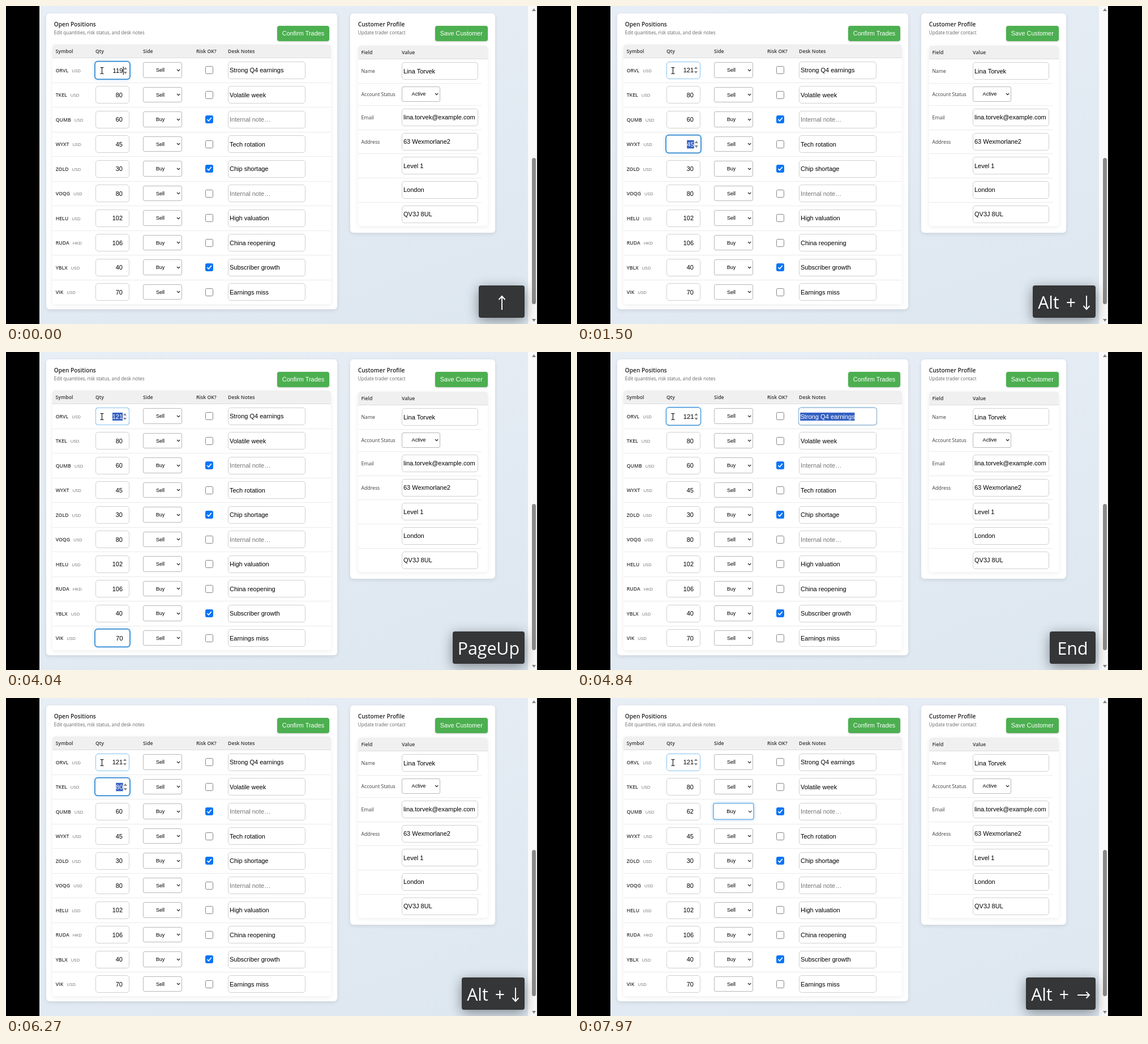
An HTML page for the animation above (8000 ms loop, 998 by 561 pixels).

```html
<!DOCTYPE html>
<html lang="en">
<head>
<meta charset="utf-8">
<title>Desk positions</title>
<style>
html, body { margin: 0; width: 100%; height: 100%; overflow: hidden; background: #000; }
#stage { position: absolute; left: 0; top: 0; width: 998px; height: 561px; overflow: hidden; background: #000; }
#stage div { position: absolute; box-sizing: border-box; white-space: pre; }
svg { position: absolute; overflow: visible; }
.page { background: linear-gradient(160deg, #e8eef6, #dde7f0); }
.card { background: #fff; border-radius: 6px; box-shadow: 0 2px 7px rgba(0,0,0,.1); }
.table { background: #fff; border-radius: 5px; box-shadow: 0 2px 8px rgba(0,0,0,.07); }
.head { background: #f0f0f0; border-bottom: 1px solid #ddd; border-radius: 5px 5px 0 0; }
.line { background: #ebebeb; }
.text { font: 8.7px/20px "Open Sans", "Noto Sans", sans-serif; color: #3c3c3c; }
.title { font-size: 10.2px; font-weight: 600; color: #222; }
.sub { font-size: 8.2px; color: #666; }
.bold { font-weight: 600; color: #333; }
.bold i { font: 400 7.8px "Open Sans", "Noto Sans", sans-serif; color: #6e6e6e; margin-left: 6px; }
.button { background: #4caf50; border-radius: 4px; color: #fff; text-align: center;
  font: 10.9px/27px "Liberation Sans", Arial, sans-serif; box-shadow: 0 1px 3px rgba(0,0,0,.2); }
.field { --f: 0; --base: #d0d0d0; --ring: #2380cc; --spread: .35px;
  display: flex; align-items: center; background: #fff; color: #000;
  font: 11px/14px "Liberation Sans", Arial, sans-serif; border-radius: 5px;
  border: 1px solid color-mix(in srgb, var(--ring) calc(var(--f) * 100%), var(--base));
  transform: scale(calc(1 + .04 * var(--f)));
  box-shadow: 0 0 0 calc(var(--f) * var(--spread)) var(--ring), 0 0 5px rgba(40,140,225,calc(var(--f) * .5)); }
.note { padding-left: 2px; }
.qty { justify-content: flex-end; padding-right: 11px; }
.select { --base: #b8b8b8; --ring: #4a9bdc; --spread: 0px; border-radius: 3px;
  justify-content: center; padding-right: 8px; font-size: 9.1px; }
.empty { color: #757575; }
.field b { font-weight: 400; }
.picked { background: #3460c2; color: #fff; }
.caret { border-right: 1px solid #000; margin-right: -1px; }
.check { border: 1px solid #858585; border-radius: 2.5px; background: #fff; }
.check.on { border-color: #0875f5; background: #0875f5; }
#key { right: 82px; top: 493px; height: 56.5px; min-width: 81px; padding: 4px 9px 0; display: flex; gap: 12px;
  align-items: center; justify-content: center; border-radius: 4px; background: #343637; color: #fff;
  font: 30.3px/40px "Open Sans", "Noto Sans", sans-serif; box-shadow: 0 5px 22px rgba(0,0,0,.42); }
#key svg { position: static; flex: none; }
</style>
</head>
<body>
<div id="stage"></div>
<script>
const stage = document.getElementById('stage');
const fields = {};

function add(cls, x, y, w, h, html = '') {
  const el = document.createElement('div');
  el.className = cls;
  el.style.cssText = `left:${x}px;top:${y}px;` + (w ? `width:${w}px;height:${h}px` : '');
  el.innerHTML = html;
  stage.append(el);
  return el;
}
const text = (x, y, str, cls = '') => add('text ' + cls, x, y - 10, 0, 0, str);
const path = (d, w, h, attrs, pos = '') =>
  `<svg width="${w}" height="${h}" style="${pos}"><path d="${d}" ${attrs}/></svg>`;
const stroke = (color, width) => `fill="none" stroke="${color}" stroke-width="${width}"`;

const spinner = path('M0 4L3 0 6 4ZM0 8L3 12 6 8Z', 6, 12, 'fill="#858585"', 'right:4px;top:8.5px');
const chevron = path('M0 0L2.6 2.7 5.2 0', 6, 3, stroke('#222', 1.1), 'right:2.5px;top:11.5px');

const input = (x, y, w, value) =>
  add('field note' + (value ? '' : ' empty'), x, y - 15.5, w, 31, `<b>${value || 'Internal note…'}</b>`);
const select = (x, y, w, value) =>
  add('field select', x, y - 13.8, w, 27.6, `<b>${value}</b>${chevron}`);

function card(x, w, h, title, sub, button, buttonX, buttonW) {
  add('card', x, 13, w, h);
  text(x + 13.7, 31.5, title, 'title');
  text(x + 13.7, 47.3, sub, 'sub');
  add('button', buttonX, 35, buttonW, 27, button);
}

// Page and scrollbar
add('page', 59, 0, 863, 561);
add('', 922, 0, 16, 561).style.background = '#fafafa';
add('', 929, 268, 6.5, 258).style.cssText += ';background:#8a8a8a;border-radius:4px';
add('', 929, 4, 7, 5, path('M0 5L3.5 0 7 5Z', 7, 5, 'fill="#858585"'));
add('', 929, 552, 7, 5, path('M0 0L3.5 5 7 0Z', 7, 5, 'fill="#858585"'));

// Positions
card(71, 514, 522, 'Open Positions', 'Edit quantities, risk status, and desk notes', 'Confirm Trades', 479, 92);
add('table', 82, 68, 492, 458);
add('head', 82, 68, 492, 24);
[[87.5, 'Symbol'], [158, 'Qty'], [242, 'Side'], [336, 'Risk OK?'], [392, 'Desk Notes']]
  .forEach(([x, label]) => text(x, 79.7, label, 'bold'));

const positions = [
  ['ORVL', 119, 'Sell', 0, 'Strong Q4 earnings'],
  ['TKEL', 80, 'Sell', 0, 'Volatile week'],
  ['QUMB', 60, 'Buy', 1, ''],
  ['WYXT', 45, 'Sell', 0, 'Tech rotation'],
  ['ZOLD', 30, 'Buy', 1, 'Chip shortage'],
  ['VOQG', 80, 'Sell', 0, ''],
  ['HELU', 102, 'Sell', 0, 'High valuation'],
  ['RUDA', 106, 'Buy', 0, 'China reopening'],
  ['YBLX', 40, 'Buy', 1, 'Subscriber growth'],
  ['VIK', 70, 'Sell', 0, 'Earnings miss']
];
positions.forEach(([symbol, qty, side, ok, note], i) => {
  const y = 113.2 + 43.5 * i;
  if (i) add('line', 82, y - 22, 492, 1);
  text(87.7, y + .4, `${symbol}<i>${symbol === 'RUDA' ? 'HKD' : 'USD'}</i>`, 'bold');
  fields['qty' + i] = add('field qty', 158, y - 15.5, 60, 31, `<b>${qty}</b>${spinner}`);
  fields['side' + i] = select(242, y, 69, side);
  add('check' + (ok ? ' on' : ''), 351.7, y - 7, 14, 14,
    ok ? path('M2.4 6.2L5 8.8 9.8 3', 12, 12, stroke('#fff', 1.7), 'left:0;top:0') : '');
  fields['note' + i] = input(392, y, 137, note);
});
fields.qty0.style.setProperty('--base', '#86c3f1');

// Customer
card(608, 256, 387, 'Customer Profile', 'Update trader contact', 'Save Customer', 757.5, 93.5);
add('table', 622, 70, 229, 318);
add('head', 622, 70, 229, 24);
text(627.5, 82, 'Field', 'bold');
text(699, 82, 'Value', 'bold');
[
  [114.7, 'Name', 'Lina Torvek'],
  [155.4, 'Account Status', 'Active'],
  [196, 'Email', 'lina.torvek@example.com'],
  [239, 'Address', '63 Wexmorlane2'],
  [281.7, '', 'Level 1'],
  [324.4, '', 'London'],
  [367.2, '', 'QV3J 8UL']
].forEach(([y, label, value], i) => {
  if (i) add('line', 622, y - (i === 1 ? 19.5 : 21.5), 218, 1);
  text(627.5, y + .6, label);
  if (i === 1) select(699, y, 68, value);
  else input(699, y, 135, value);
});

// Mouse pointer
add('', 166, 108, 7, 12, path('M.5 .5H2.5L3.5 1.5 4.5 .5H6.5M3.5 1.5V10.5M.5 11.5H2.5L3.5 10.5 4.5 11.5H6.5',
  7, 12, stroke('#111', 1.1)));

const key = add('', 0, 0, 0, 0);
key.id = 'key';
key.style.cssText = '';
const arrow = (d, w) => path(d, w, 26, stroke('#fff', 1.9));
const up = arrow('M7 26V2M1.5 8L7 2 12.5 8', 14);
const down = arrow('M7 1V25M1.5 19L7 25 12.5 19', 14);
const right = arrow('M3 14H24M18.5 8.5L24 14 18.5 19.5', 26);
const alt = symbol => `<span>Alt</span><span>+</span>${symbol}`;

// Each timeline holds [start in ms, value]
const keys = [[0, up], [570, alt(down)], [2000, 'PageUp'], [2840, 'PageDown'], [4040, 'PageUp'],
  [4770, 'End'], [5240, 'Home'], [5840, alt(down)], [6910, up], [7640, alt(right)]];
const focus = [[-1000, 'qty0'], [830, 'qty1'], [1060, 'qty2'], [1285, 'qty3'], [2000, 'qty0'], [2840, 'qty9'],
  [4040, 'qty0'], [4800, 'note0'], [5240, 'qty0'], [6040, 'qty1'], [6400, 'qty2'], [7770, 'side2']];
const edits = {
  qty0: [[0, 119], [170, 120], [370, 121]],
  qty2: [[0, 60], [6910, 61], [7110, 62]]
};
const indexAt = (list, t) => list.findLastIndex(([start]) => start <= t);
const valueAt = (list, t) => list[indexAt(list, t)][1];

// CSS "ease" curve: cubic-bezier(.25, .1, .25, 1)
function ease(x) {
  if (x >= 1) return 1;
  let lo = 0, hi = 1, s;
  for (let i = 0; i < 18; i++) {
    s = (lo + hi) / 2;
    if (.75 * s * (1 - s) + s ** 3 < x) lo = s; else hi = s;
  }
  return .3 * s * (1 - s) ** 2 + 3 * s * s * (1 - s) + s ** 3;
}

let shownKey;
function render(t) {
  const label = valueAt(keys, t);
  if (label !== shownKey) key.innerHTML = shownKey = label;

  const n = indexAt(focus, t);
  const [start, current] = focus[n];
  const previous = n ? focus[n - 1][1] : '';
  const amount = ease((t - start) / 200);
  const typing = t < 830 || t >= 6910;

  for (const id in fields) {
    const el = fields[id], value = el.firstChild, active = id === current;
    el.style.setProperty('--f', active ? amount : id === previous ? 1 - amount : 0);
    if (edits[id]) value.textContent = valueAt(edits[id], t);
    if (id.startsWith('side')) continue;
    value.className = !active ? '' : typing ? 'caret' : 'picked';
    if (id.startsWith('qty'))
      el.lastChild.style.visibility = active || id === 'qty0' ? 'visible' : 'hidden';
  }
}

function tick() {
  render(performance.now() % 8000);
  requestAnimationFrame(tick);
}
tick();
</script>
</body>
</html>
```
